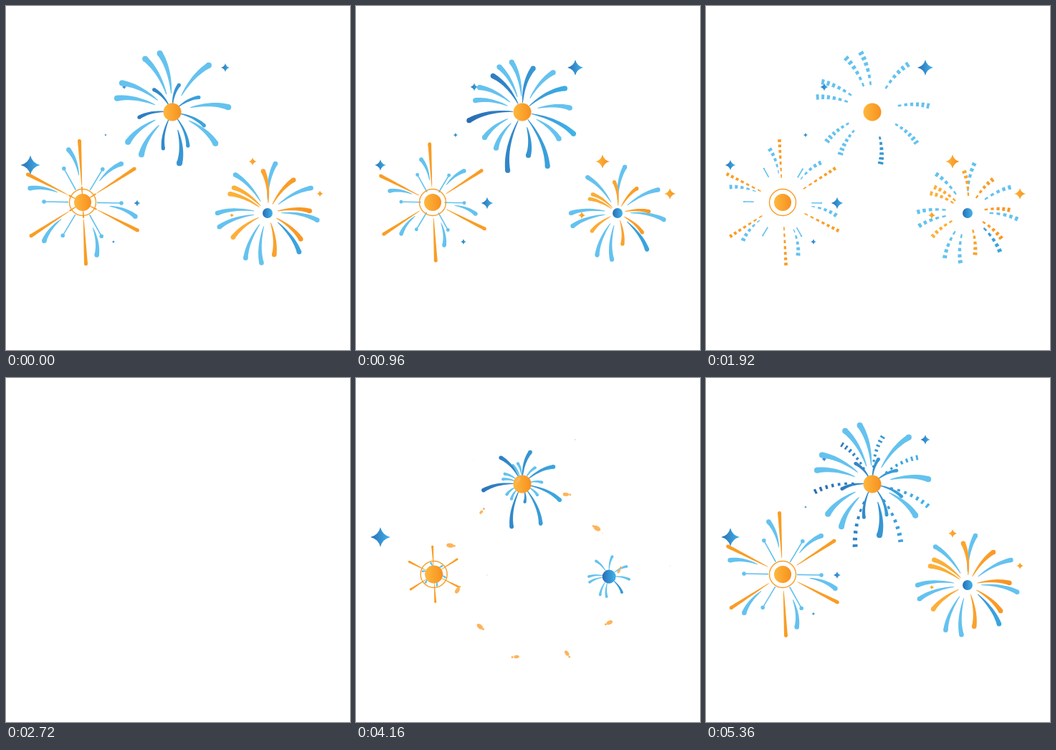
An HTML page with a canvas that plays this animation: 480x480 px, repeating every 5440 ms.

```html
<!DOCTYPE html>
<html lang="en">
<head>
<meta charset="utf-8">
<title>Fireworks</title>
<style>
  html, body { margin: 0; width: 100%; height: 100%; overflow: hidden; background: #fff; }
  canvas { display: block; width: 100vmin; height: 100vmin; }
</style>
</head>
<body>
<canvas id="stage" width="480" height="480"></canvas>
<script>
const ctx = document.getElementById('stage').getContext('2d');
const LOOP = 5440, STEP = 80, TAU = Math.PI * 2, RAD = Math.PI / 180;
const ORIGIN = [243, 268];
const SKY = '#64c2ef', AMBER = '#f99d25', EMBER = '#ffa830', SPARK = '#fdb45c';
const BLUE = ['#2a6cb4', '#40b4ea'], ORANGE = ['#fdb83f', '#f7901e'];

const clamp = v => Math.max(0, Math.min(1, v));
const span = (t, from, to) => clamp((t - from) / (to - from));
const easeOut = (u, power = 3) => 1 - (1 - clamp(u)) ** power;
const lerp = (a, b, u) => a + (b - a) * u;
const times = (n, fn) => Array.from({ length: n }, (_, i) => fn(i));
const evenly = (n, first) => times(n, i => first + i * 360 / n);

function noise(i) {
  const v = Math.sin(i * 127.1 + 3.7) * 43758.5453;
  return v - Math.floor(v);
}

function polar([x, y], r, degrees) {
  return [x + r * Math.cos(degrees * RAD), y + r * Math.sin(degrees * RAD)];
}

function sideways([from, to], x, r) {
  const g = ctx.createLinearGradient(x - r, 0, x + r, 0);
  g.addColorStop(0, from);
  g.addColorStop(1, to);
  return g;
}

function disc([x, y], r) {
  if (r <= 0) return;
  ctx.beginPath();
  ctx.arc(x, y, r, 0, TAU);
  ctx.fill();
}

function polygon(points) {
  points.forEach((p, i) => ctx[i ? 'lineTo' : 'moveTo'](...p));
  ctx.closePath();
}

// A group of rays: tip angles, reach (plus droop towards the bottom), inner radius,
// lift (how far rays arch upwards, in degrees), width, and when each burst is born and breaks up.
const groupDefaults = { droop: 0, lift: 9, width: 6.5, fades: [5500, 7050], fadeTime: 520 };
const group = options => ({ ...groupDefaults, ...options });

const fireworks = [
  {
    at: [232, 148], radius: 12.5, ball: ORANGE, shrink: 1.2, launch: 3385, travel: 840, power: 5, sag: 0,
    groups: [
      group({ paint: SKY, accent: 82, angles: [258, 243, 308, 210, 194, 355, 36, 126, 146, 82],
        reach: 78, droop: -6, inner: 26, width: 8, births: [4000, 5840], growth: 1200 }),
      group({ paint: BLUE, angles: [284, 331, 23, 65, 104, 171, 231],
        reach: 80, droop: 12, inner: 14, lift: 12, width: 7.5, births: [3235, 4705], growth: 3000,
        fades: [5100, 6480], fadeTime: 340 })
    ]
  },
  {
    at: [107, 274], radius: 12, ball: ORANGE, shrink: 1.2, launch: 3560, travel: 780, power: 3, sag: 0, ring: 18.5,
    groups: [
      group({ paint: SKY, angles: evenly(6, 15), reach: 76, inner: 38, lift: 7, pins: 54,
        births: [4060, 5840], growth: 1300 }),
      group({ paint: AMBER, angles: evenly(6, 27), reach: 86, inner: 23, lift: 0, width: 5,
        births: [3835, 5280], growth: 1800 })
    ]
  },
  {
    at: [365, 289], radius: 7, ball: BLUE, shrink: 4, launch: 3620, travel: 1000, power: 3, sag: 28,
    groups: [
      group({ paint: SKY, accent: 51, angles: [279, 230, 330, 8, 180, 164, 116, 97, 51],
        reach: 70, inner: 19, births: [3890, 5400], growth: 1700 }),
      group({ paint: ORANGE, angles: [264, 308, 357, 38, 81, 145, 217, 207],
        reach: 59, inner: 14, births: [4170, 5860], growth: 1500 })
    ]
  }
];

const star = colours => ([x, y, size]) => ({ x, y, size, colours });
const stars = [
  ...[[34, 222, 10], [306, 86, 9], [183, 275, 6.8], [165, 113, 4.6], [139, 180, 2.5], [150, 329, 3]].map(star(BLUE)),
  ...[[344, 217, 8], [438, 262, 6.5], [315, 292, 4.2]].map(star(ORANGE))
];

function rayCurve(g, angle, centre, size) {
  const lean = angle - g.lift * Math.sign(Math.cos(angle * RAD));
  const reach = g.reach + g.droop * Math.sin(angle * RAD);
  const base = polar(centre, g.inner * size, lean);
  const bow = polar(centre, lerp(g.inner, reach, 0.6) * size, lean);
  const tip = polar(centre, reach * size, angle);
  return u => [0, 1].map(k => lerp(lerp(base[k], bow[k], u), lerp(bow[k], tip[k], u), u));
}

function taper(pointAt, from, to, half) {
  const left = [], right = [];
  for (let i = 0; i <= 12; i++) {
    const u = lerp(from, to, i / 12);
    const [px, py] = pointAt(u), [qx, qy] = pointAt(u + 0.01);
    const len = Math.hypot(qx - px, qy - py) || 1;
    const w = half * (0.12 + 0.88 * u ** 0.8);
    const nx = (py - qy) / len * w, ny = (qx - px) / len * w;
    left.push([px + nx, py + ny]);
    right.unshift([px - nx, py - ny]);
  }
  ctx.beginPath();
  polygon([...left, ...right]);
  ctx.fill();
}

function drawRay(g, angle, centre, scale, gone) {
  const pointAt = rayCurve(g, angle, centre, scale * (1 + 0.1 * gone));
  const half = g.width / 2 * (0.25 + 0.75 * scale);
  if (!gone) {
    taper(pointAt, 0, 1, half);
    disc(pointAt(1), half);
    return;
  }
  const dashes = Math.max(3, Math.round((g.reach - g.inner) / 8));
  const kept = 1 - 0.8 * gone;
  for (let i = Math.floor(gone * dashes * 0.3); i < dashes; i++) {
    taper(pointAt, i / dashes, (i + kept) / dashes, half);
  }
}

function drawPins(length, centre, scale, gone) {
  ctx.strokeStyle = SKY;
  ctx.lineWidth = 1.6;
  for (const angle of evenly(6, 1)) {
    const tip = polar(centre, length * scale, angle);
    ctx.beginPath();
    ctx.moveTo(...polar(centre, lerp(20, length, gone) * scale, angle));
    ctx.lineTo(...tip);
    ctx.stroke();
    disc(tip, 2.8 * (0.3 + 0.7 * scale) * (1 - gone));
  }
}

function drawGroup(g, centre, t) {
  const fillFor = paint => Array.isArray(paint) ? sideways(paint, centre[0], 75) : paint;
  g.births.forEach((birth, i) => {
    for (const now of [t, t + LOOP]) {
      if (now <= birth || now >= g.fades[i] + g.fadeTime) continue;
      const scale = easeOut((now - birth) / g.growth);
      const gone = span(now, g.fades[i], g.fades[i] + g.fadeTime);
      for (const angle of g.angles) {
        ctx.fillStyle = fillFor(angle === g.accent ? BLUE : g.paint);
        drawRay(g, angle, centre, scale, gone);
      }
      if (g.pins) drawPins(g.pins, centre, scale, gone);
    }
  });
}

function drawFirework(fw, t) {
  const rising = t >= 2720;
  if (rising && t <= fw.launch) return;
  const p = rising ? easeOut((t - fw.launch) / fw.travel, fw.power) : 1;
  const size = rising ? 1 : 1 - span(t, 2320, 2700);
  const centre = [0, 1].map(k => lerp(ORIGIN[k], fw.at[k], p));
  centre[1] -= fw.sag * 4 * p * (1 - p);
  fw.groups.forEach(g => drawGroup(g, centre, t));
  const r = (fw.radius + fw.shrink * (1 - p) ** 0.2) * size;
  if (r <= 0) return;
  ctx.fillStyle = sideways(fw.ball, centre[0], r);
  disc(centre, r);
  if (fw.ring) {
    ctx.strokeStyle = AMBER;
    ctx.lineWidth = 1.4 * size;
    ctx.beginPath();
    ctx.arc(...centre, fw.ring * size, 0, TAU);
    ctx.stroke();
  }
}

// The first star leads; the others twinkle in the opposite phase.
function drawStar({ x, y, size, colours }, i, t) {
  const leads = i === 0;
  const appears = leads ? 3760 : 4120, leaves = leads ? 1900 : 2320;
  const shown = t < 2720 ? 1 - span(t, leaves, leaves + 360) : span(t, appears, appears + 320);
  const swing = (leads ? 0.38 : -0.35) * Math.cos((t - 80) / 1360 * TAU);
  const r = size * (1 + swing) * shown, k = r * 0.2;
  if (r <= 0) return;
  ctx.fillStyle = sideways(colours, x, r);
  ctx.beginPath();
  ctx.moveTo(x, y - r);
  ctx.quadraticCurveTo(x + k, y - k, x + r, y);
  ctx.quadraticCurveTo(x + k, y + k, x, y + r);
  ctx.quadraticCurveTo(x - k, y + k, x - r, y);
  ctx.quadraticCurveTo(x - k, y - k, x, y - r);
  ctx.fill();
}

function drawRocket(t) {
  if (t < 3040 || t >= 3440) return;
  const y = lerp(470, ORIGIN[1], easeOut((t - 3040) / 360, 2));
  const tail = 46 * (1 - span(t, 3280, 3440));
  ctx.fillStyle = EMBER;
  ctx.beginPath();
  polygon([[239.5, y], [242, y + tail], [244.5, y]]);
  ctx.fill();
  disc([242, y], 3);
}

function drawBlast(t) {
  if (t <= 3360 || t >= 3760) return;
  const spent = span(t, 3520, 3760);
  const r = 33 * easeOut((t - 3360) / 160) + 30 * spent;
  const hole = lerp(0.7, 1, spent), core = r * (1 - spent);
  const jagged = (count, radius, rough) =>
    polygon(evenly(count, 0).map((a, i) => polar(ORIGIN, radius * (0.9 + rough * noise(i + count)), a)));
  ctx.fillStyle = EMBER;
  ctx.beginPath();
  jagged(44, r, 0.22);
  jagged(30, r * hole, 0.12);
  ctx.fill('evenodd');
  for (const a of evenly(5, -100)) {
    ctx.beginPath();
    polygon([polar(ORIGIN, core, a), polar(ORIGIN, core * 0.42, a + 36), ORIGIN, polar(ORIGIN, core * 0.42, a - 36)]);
    ctx.fill();
  }
  disc(ORIGIN, core * 0.36);
}

function drawDebris(t) {
  if (t < 3520 || t >= 4480) return;
  const late = span(t, 4160, 4480), size = 1 - late;
  const flown = easeOut((t - 3480) / 680, 2);
  ctx.fillStyle = SPARK;
  evenly(11, -32).forEach((angle, i) => {
    const [x, y] = polar(ORIGIN, (105 + 35 * noise(i)) * flown, angle);
    const turn = noise(i + 40) * TAU, long = (3 + 2.5 * noise(i + 20)) * size;
    ctx.beginPath();
    ctx.ellipse(x, y + 8 * late, long, long * 0.6, turn, 0, TAU);
    ctx.fill();
    disc([x + 6 * Math.cos(turn), y + 8 * late + 6 * Math.sin(turn)], 1.5 * size);
  });
}

function draw(t) {
  ctx.fillStyle = '#fff';
  ctx.fillRect(0, 0, 480, 480);
  stars.forEach((s, i) => drawStar(s, i, t));
  drawRocket(t);
  fireworks.forEach(fw => drawFirework(fw, t));
  drawBlast(t);
  drawDebris(t);
}

const start = performance.now();
function tick() {
  const t = (performance.now() - start) % LOOP;
  draw(Math.floor(t / STEP) * STEP);
  requestAnimationFrame(tick);
}
tick();
</script>
</body>
</html>
```
